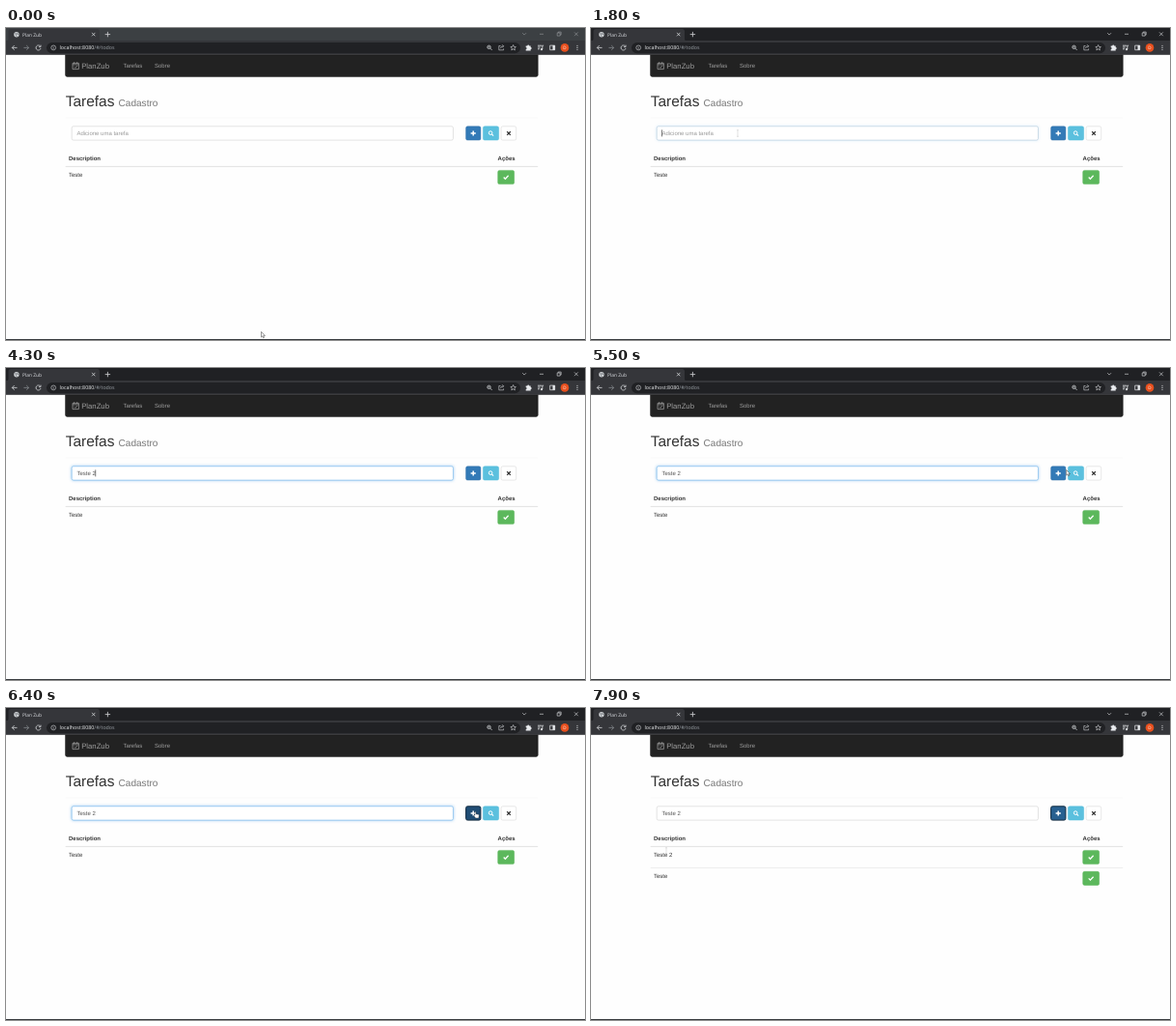
An HTML page for the animation above (8000 ms loop, 600 px wide and 323 px high).

```html
<!DOCTYPE html>
<html lang="pt">
<head>
<meta charset="utf-8">
<title>Plan Zub</title>
<style>
  html, body { margin: 0; width: 100%; height: 100%; overflow: hidden; background: #fefefe; }
  svg { display: block; width: 600px; height: 323px; }
  text { font: 6.01px "Liberation Sans", Arial, sans-serif; fill: #333; white-space: pre; text-rendering: geometricPrecision; }
  .ui { font-family: "Open Sans", "Noto Sans", sans-serif; }
  .line { fill: none; stroke: #d5d7da; stroke-width: .8; }
  .bold { font-weight: bold; }
  .nav { fill: #9d9d9d; }
</style>
</head>
<body>
<svg viewBox="0 0 600 323">
  <defs>
    <filter id="blur" x="-5%" y="-80%" width="110%" height="260%"><feGaussianBlur stdDeviation="1.5"/></filter>
    <g id="done">
      <rect x="509.7" y="147.4" width="16.9" height="14.2" rx="1.7" fill="#5cb85c" stroke="#4cae4c" stroke-width=".45"/>
      <path d="M515.7 154.5l1.7 1.7l3.2-3.4" fill="none" stroke="#fff" stroke-width="1.3"/>
    </g>
  </defs>

  <rect width="600" height="323" fill="#fefefe"/>

  <!-- browser chrome -->
  <rect id="strip" width="600" height="14"/>
  <path d="M0 13.5Q2.5 13.5 2.5 11V3.5Q2.5 1 5 1H94.5Q97 1 97 3.5V11Q97 13.5 99.5 13.5Z" fill="#35363a"/>
  <rect y="13" width="600" height="14.8" fill="#35363a"/>
  <rect x="42" y="15" width="491" height="11.2" rx="5.6" fill="#202124"/>
  <circle cx="10.9" cy="6.8" r="2.7" fill="#d0d3d6"/>
  <path d="M9 5.7l2.1 .5l-.7 1.5l1 1.2M12 4.8l-.4 1.2l1.5 .8" fill="none" stroke="#55585c" stroke-width=".6"/>
  <text class="ui" x="17" y="8.5" style="font-size:4.9px;fill:#dfe1e5">Plan Zub</text>
  <path class="line" d="M89 4.9l3.4 3.4m0-3.4l-3.4 3.4M102.7 6.6h5.4m-2.7-2.7v5.4"/>
  <g id="controls">
    <path class="line" d="M535.2 5.2l1.9 1.9l1.9-1.9M553 6.3h4M571.2 5.1h3v3h-3zM572.2 5v-.9h3v3h-.9M589 4.4l3.8 3.8m0-3.8l-3.8 3.8" style="stroke-width:.65"/>
  </g>
  <path class="line" d="M11.5 20.4H6.3m2.4-2.4l-2.4 2.4l2.4 2.4"/>
  <path class="line" d="M18.4 20.4h5.2m-2.4-2.4l2.4 2.4l-2.4 2.4" style="stroke:#85888c"/>
  <path class="line" d="M35.5 18.9A2.5 2.5 0 1 0 36 21M36 17.6v2h-2"/>
  <circle class="line" cx="49.2" cy="20.4" r="2.4" style="stroke-width:.6"/>
  <path class="line" d="M49.2 20v1.7m0-2.8v.5" style="stroke-width:.6"/>
  <text class="ui" x="55.5" y="22.3" style="font-size:5.3px;fill:#eceef0">localhost:8080<tspan fill="#9aa0a6">/#/todos</tspan></text>
  <circle class="line" cx="500.5" cy="19.8" r="1.7"/>
  <path class="line" d="M501.8 21.1l1.8 1.8M499.6 19.8h1.8"/>
  <path class="line" d="M512.5 18.5h-1.7v4.3h4.8v-1.5M512.4 21q.3-2.2 3.2-2.2m-1.4-1.5l1.5 1.5l-1.5 1.5" style="stroke-width:.6"/>
  <path class="line" d="M525.6 17.5l.8 1.9l2 .2l-1.5 1.3l.5 2l-1.8-1.1l-1.8 1.1l.5-2l-1.5-1.3l2-.2z" style="stroke-width:.6"/>
  <path d="M538.7 18.5h1.5a1 1 0 0 1 2 0h1.5v1.6a1 1 0 0 1 0 2v1.4h-5v-1.5a.9 .9 0 0 0 0-1.9z" fill="#e8eaed"/>
  <path class="line" d="M551 18.2h4.2M551 20h2.8M551 21.8h2M555.8 22v-3.8h1.3" style="stroke-width:.9"/>
  <circle cx="555" cy="22.2" r="1.1" fill="#e8eaed"/>
  <path class="line" d="M563.7 18.1h5v4.6h-5z"/>
  <path d="M566.5 18h2.3v4.8h-2.3z" fill="#e8eaed"/>
  <circle cx="579" cy="20.4" r="4.3" fill="#e8501e"/>
  <text class="ui" x="579" y="22.1" text-anchor="middle" style="font-size:4.6px;fill:#fff">D</text>
  <g fill="#d5d7da"><circle cx="592" cy="18.3" r=".6"/><circle cx="592" cy="20.4" r=".6"/><circle cx="592" cy="22.5" r=".6"/></g>

  <!-- navbar and heading -->
  <path d="M61.5 27.8H551.3V48.6Q551.3 50.4 549.5 50.4H63.3Q61.5 50.4 61.5 48.6Z" fill="#222" stroke="#080808" stroke-width=".4"/>
  <path d="M69 36.4h6.4v6.2H69zM69 37.9h6.4M70.7 35.2v1.8M73.7 35.2v1.8M70.7 40.2l1.1 1.1l2-2.1" fill="none" stroke="#9d9d9d" stroke-width=".75"/>
  <text class="nav" x="78.2" y="41.7" style="font-size:7.73px">PlanZub</text>
  <text class="nav" x="121.5" y="41.2">Tarefas</text>
  <text class="nav" x="154" y="41.2">Sobre</text>
  <text x="61.7" y="81.4" style="font-size:15.46px">Tarefas</text>
  <text x="116.6" y="81.4" style="font-size:10.05px;fill:#777">Cadastro</text>
  <rect x="61.7" y="92.8" width="489.5" height=".45" fill="#eee"/>

  <!-- form -->
  <rect id="glow" x="67.6" y="101.2" width="396.4" height="15.4" rx="2" fill="#66afe9" filter="url(#blur)"/>
  <rect id="field" x="68.2" y="101.8" width="395.2" height="14.3" rx="1.7" fill="#fff" stroke-width=".55"/>
  <text id="value" x="73.4" y="111.1"></text>
  <rect id="caret" y="105.4" width=".6" height="7" fill="#222"/>
  <rect id="add" x="476.6" y="101.8" width="15.3" height="14.3" rx="1.7"/>
  <path d="M481.6 109h5.2m-2.6-2.6v5.2" stroke="#fff" stroke-width="1.5"/>
  <rect x="494.4" y="101.8" width="16.2" height="14.3" rx="1.7" fill="#5bc0de" stroke="#46b8da" stroke-width=".45"/>
  <circle cx="502.1" cy="108.6" r="1.8" fill="none" stroke="#fff" stroke-width="1"/>
  <path d="M503.4 109.9l1.7 1.7" stroke="#fff" stroke-width="1.2"/>
  <rect x="513.1" y="101.8" width="15.6" height="14.3" rx="1.7" fill="#fff" stroke="#ccc" stroke-width=".45"/>
  <path d="M519.2 107.3l3.6 3.6m0-3.6l-3.6 3.6" stroke="#333" stroke-width="1.3"/>

  <!-- table -->
  <text class="bold" x="65" y="137.2">Description</text>
  <text class="bold" x="509.6" y="137.2">Ações</text>
  <rect x="61.7" y="142.9" width="489.5" height=".86" fill="#ddd"/>
  <text id="firstRow" x="65" y="154.1"></text>
  <use href="#done"/>
  <g id="secondRow">
    <rect x="61.7" y="165.2" width="489.5" height=".5" fill="#ddd"/>
    <text x="65" y="175.9">Teste</text>
    <use href="#done" y="21.9"/>
  </g>
  <rect y="322" width="600" height="1" fill="#3a3d40"/>

  <!-- pointer shapes, hot spot at 0,0 -->
  <g id="pointer">
    <path id="arrow" d="M0 0V5.6L1.3 4.4L2.1 6.3L3 5.9L2.2 4.1H3.9Z" fill="#fff" stroke="#333" stroke-width=".5"/>
    <path id="beam" d="M-1 -3.3H1M0 -3.3V3.3M-1 3.3H1" fill="none" stroke="#888" stroke-width=".4" opacity=".6"/>
    <path id="hand" d="M0 0Q.9-.5 1 .5V2.2L3.6 2.8Q4.3 3 4.2 3.8L3.7 6.4H.7L-1.2 4Q-1.2 3-.1 3.6Z" fill="#fff" stroke="#333" stroke-width=".4"/>
  </g>
</svg>
<script>
const LOOP = 8000;
const CLICK_FIELD = 1750, PRESS = 6340, RELEASE = 6480, ADDED = 6500, FADE = 150;

const typed = [
  [2560, "T"], [2660, "Te"], [2860, "Tes"], [3060, "Test"],
  [3260, "Teste"], [3660, "Teste "], [3980, "Teste 2"]
];

// time, x, y of the pointer's hot spot
const path = [
  [40, 264.5, 314.5], [1000, 141.5, 136], [1100, 141.5, 136], [1650, 152, 109],
  [4850, 152, 109], [5500, 492.6, 105.5], [5700, 486, 107.5],
  [7150, 486, 107.5], [7860, 78, 148]
];

const $ = id => document.getElementById(id);
const set = (id, attrs) => { for (const k in attrs) $(id).setAttribute(k, attrs[k]); };
const show = (id, on) => set(id, { visibility: on ? "visible" : "hidden" });
const clamp = v => Math.max(0, Math.min(1, v));
const within = (v, a, b) => v >= a && v <= b;
const mix = (a, b, k) => a + (b - a) * k;
const mixColor = (a, b, k) => `rgb(${a.map((v, i) => Math.round(mix(v, b[i], k)))})`;

function pointerAt(t) {
  const i = path.findIndex(p => p[0] > t);
  if (i === 0) return path[0].slice(1);
  if (i < 0) return path[path.length - 1].slice(1);
  const [a, b] = [path[i - 1], path[i]];
  const u = (t - a[0]) / (b[0] - a[0]);
  const k = u * u * (3 - 2 * u);
  return [mix(a[1], b[1], k), mix(a[2], b[2], k)];
}

function drawPointer(t, x, y, overAdd) {
  const overField = within(x, 68, 463.5) && within(y, 101.5, 116.5);
  const overRow = t > ADDED && within(x, 65, 85) && within(y, 145, 156);
  const shape = overAdd ? "hand" : overField || overRow ? "beam" : "arrow";
  const hiddenByTyping = within(t, typed[0][0], 4850);
  set("pointer", { transform: `translate(${x} ${y})` });
  for (const id of ["arrow", "beam", "hand"]) show(id, id === shape && !hiddenByTyping);
}

function drawField(t) {
  const key = typed.filter(k => k[0] <= t).pop();
  const text = key ? key[1] : "";
  const focus = clamp((t - CLICK_FIELD) / FADE) - clamp((t - 6410) / FADE);
  $("value").textContent = text || "Adicione uma tarefa";
  $("value").style.fill = text ? "#555" : "#999";
  set("glow", { opacity: .6 * focus });
  set("field", { stroke: mixColor([204, 204, 204], [102, 175, 233], focus) });

  const since = t - (key ? key[0] : CLICK_FIELD);
  const width = text ? $("value").getComputedTextLength() : 0;
  set("caret", { x: 73.2 + width });
  show("caret", within(t, CLICK_FIELD, PRESS) && since % 1000 < 500);
}

function drawAdd(t, hover) {
  const pressed = within(t, PRESS, RELEASE), focused = t >= PRESS;
  set("add", {
    fill: pressed ? "#204d74" : hover || focused ? "#286090" : "#337ab7",
    stroke: focused ? "#122b40" : hover ? "#204d74" : "#2e6da4",
    "stroke-width": focused ? 1 : .45
  });
}

function render(t) {
  const active = t >= 1700;
  set("strip", { fill: active ? "#202124" : "#3c4043" });
  set("controls", { opacity: active ? 1 : .55 });

  const [x, y] = pointerAt(t);
  const overAdd = within(x, 476.5, 492) && within(y, 101.5, 116.5);
  drawField(t);
  drawAdd(t, overAdd);
  $("firstRow").textContent = t >= ADDED ? "Teste 2" : "Teste";
  show("secondRow", t >= ADDED);
  drawPointer(t, x, y, overAdd);
}

const start = performance.now();
function tick() {
  render((performance.now() - start) % LOOP);
  requestAnimationFrame(tick);
}
tick();
</script>
</body>
</html>
```
